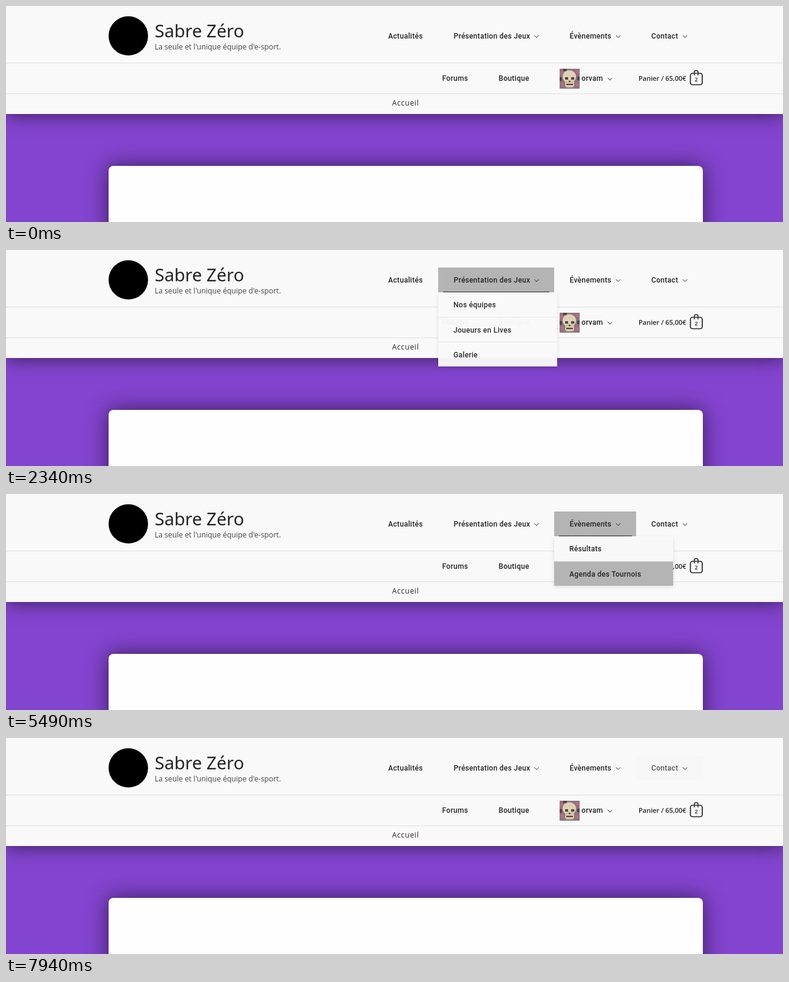
An HTML page that plays this animation: 1280 px wide and 358 px high, repeating every 8 s.

```html
<!DOCTYPE html>
<html lang="fr">
<head>
<meta charset="utf-8">
<title>Menu</title>
<style>
html, body { margin: 0; width: 100%; height: 100%; overflow: hidden; background: #8344cf; }
#stage { position: relative; width: 1280px; height: 358px; overflow: hidden; color: #242424; }
#stage * { position: absolute; box-sizing: border-box; }
#stage svg * { position: static; }
.card { left: 169px; top: 265px; width: 979px; height: 130px; border-radius: 8px; background: #fefefe; box-shadow: 0 0 35px rgba(0,0,0,.58); }
.header { left: 0; top: 0; width: 1280px; height: 179px; background: #f9f9f9; box-shadow: 0 2px 28px rgba(0,0,0,.55); }
.rule { left: 0; width: 1280px; height: 1px; background: #e0e0e0; }
.logo { left: 169px; top: 17px; width: 65px; height: 65px; border-radius: 50%; background: #000; }
.text { white-space: nowrap; line-height: 20px; font: 500 12px/20px Roboto, sans-serif; letter-spacing: .3px; }
.brand { font: 500 29px/20px "Noto Sans", "Open Sans", sans-serif; letter-spacing: 0; }
.tagline { font: 400 12.2px/20px "Open Sans", sans-serif; letter-spacing: 0; color: #444; }
.crumb { font: 400 12px/20px "Open Sans", sans-serif; letter-spacing: .75px; }
.cart { font: 600 11px/20px "Open Sans", sans-serif; letter-spacing: 0; }
.count { font: 600 9px/20px "Open Sans", sans-serif; letter-spacing: 0; }
.tab { top: 29px; height: 41px; background: #000; }
.line { top: 69px; height: 1px; background: #222; }
.sub { top: 70px; width: 196px; background: #f9f9f9; box-shadow: 0 2px 6px rgba(0,0,0,.12); }
.row { left: 0; width: 196px; height: 41px; }
.row + .row { border-top: 1px solid #e6e6e6; }
.shade { left: 0; top: 0; width: 100%; height: 100%; background: #000; }
#art { left: 0; top: 0; }
</style>
</head>
<body>
<div id="stage">
  <div class="card"></div>
  <div class="header"></div>
  <div class="rule" style="top:94px"></div>
  <div class="rule" style="top:145px"></div>
  <div class="logo"></div>
  <svg id="art" width="1280" height="180" fill="none" stroke="#242424">
    <g stroke="none">
      <path fill="#8b7480" d="M912 104h33v33h-33z"/>
      <path fill="#b66f80" d="M912 108h5v6h-5zM939 106h5v6h-5zM914 127h5v6h-5zM938 128h6v5h-6z"/>
      <path fill="#51434d" d="M918 104h6v4h-6zM912 118h4v6h-4zM941 117h4v6h-4z"/>
      <ellipse cx="928" cy="117" rx="11" ry="10.5" fill="#ded2b5"/>
      <rect x="921" y="122" width="15" height="13" rx="4" fill="#d3c5a6"/>
      <path fill="#504439" d="M921 118h5v4h-5zM931 118h5v4h-5zM927 124h3v2h-3zM923 129h11v2h-11z"/>
    </g>
    <rect x="1127.5" y="111.5" width="19.5" height="19" rx="3.5" stroke-width="1.7"/>
    <path d="M1134 115v-5.500q0-2.500 3-2.500t3 2.500v5.500" stroke-width="1.5"/>
  </svg>
</div>
<script>
const LOOP = 8000, FADE = 300, HIDE = 80, SHADE = .28;
const stage = document.getElementById('stage');
const art = document.getElementById('art');

// Spans are [enter, leave] times of the pointer, in ms.
const menus = [
  { label: 'Actualités', x0: 604, x1: 712, span: [1340, 2050], rows: [] },
  { label: 'Présentation des Jeux', x0: 712, x1: 903, span: [2050, 4660], rows: [
    { label: 'Nos équipes', spans: [[2820, 3060], [3840, 3925], [4110, 4640]] },
    { label: 'Joueurs en Lives', spans: [[3060, 3280], [3640, 3840], [3925, 4110]] },
    { label: 'Galerie', spans: [[3280, 3640]] } ] },
  { label: 'Évènements', x0: 903, x1: 1037.5, span: [4660, 6620], rows: [
    { label: 'Résultats', spans: [[5170, 5220], [5670, 5860], [6110, 6580]] },
    { label: 'Agenda des Tournois', spans: [[5220, 5670], [5860, 6110]] } ] },
  { label: 'Contact', x0: 1037.5, x1: 1148, span: [6620, 7690], rows: [
    { label: 'Nous rejoindre', spans: [[7060, 7690]] } ] }
];

function add(parent, className, style = {}, text = '') {
  const el = document.createElement('div');
  el.className = className;
  el.textContent = text;
  Object.assign(el.style, style);
  return parent.appendChild(el);
}
const label = (parent, x, middle, text, kind = '') =>
  add(parent, 'text ' + kind, { left: x + 'px', top: middle - 10 + 'px' }, text);

function chevron(x, y) {
  const path = document.createElementNS('http://www.w3.org/2000/svg', 'path');
  path.setAttribute('d', `M${x - 3.7} ${y - 1.8}l3.7 3.600l3.700 -3.600`);
  art.append(path);
}

label(stage, 245, 41, 'Sabre Zéro', 'brand');
label(stage, 245, 68, "La seule et l'unique équipe d'e-sport.", 'tagline');
label(stage, 718.5, 120, 'Forums');
label(stage, 811.5, 120, 'Boutique');
label(stage, 948, 120, 'orvam');
label(stage, 1042, 120, 'Panier / 65,00€', 'cart');
label(stage, 1134.5, 121.5, '2', 'count');
label(stage, 636, 161, 'Accueil', 'crumb');
[[874, 50.5], [1008.5, 50.5], [1118.5, 50.5], [995, 121]].forEach(p => chevron(...p));

for (const m of menus) {
  m.tab = add(stage, 'tab', { left: m.x0 + 'px', width: m.x1 - m.x0 + 'px' });
  m.lineIn = add(stage, 'line');
  m.lineOut = add(stage, 'line');
  m.title = label(stage, m.x0 + 25.5, 50, m.label);
}
stage.append(art);
for (const m of menus) {
  m.sub = add(stage, 'sub', { left: Math.round(m.x0) + 'px', height: m.rows.length * 41 + 'px' });
  m.rows.forEach((r, i) => {
    const row = add(m.sub, 'row', { top: i * 41 + 'px' });
    r.shade = add(row, 'shade');
    label(row, 25, 20.5, r.label);
  });
}

const ramp = (t, start, length = FADE) => Math.min(1, Math.max(0, (t - start) / length));
const ease = p => 1 - (1 - p) ** 2;
const level = (t, [enter, leave]) => ease(ramp(t, enter)) * (1 - ease(ramp(t, leave)));

function setLine(el, left, right, opacity) {
  el.style.left = left + 'px';
  el.style.width = Math.max(0, right - left) + 'px';
  el.style.opacity = opacity;
}

function draw(t) {
  for (const m of menus) {
    const [enter, leave] = m.span;
    const p = ease(ramp(t, enter)), q = ease(ramp(t, leave));
    const from = m.x0 - 14, left = m.x0 + 8, right = m.x1 - 7;
    m.tab.style.opacity = SHADE * level(t, m.span);
    // The underline grows in from the left and leaves to the right.
    setLine(m.lineIn, from + 22 * p, from + (right - from) * p ** 3, t < leave ? p : 0);
    setLine(m.lineOut, left + (m.x1 + 14 - left) * q ** .8, right + 21 * q, t < leave ? 0 : 1 - q);
    m.sub.style.opacity = ramp(t, enter) * (1 - ramp(t, leave, HIDE));
    for (const r of m.rows)
      r.shade.style.opacity = SHADE * Math.max(...r.spans.map(s => level(t, s)));
  }
  menus[3].title.style.color = t > 7740 ? '#555' : '';
}

const start = performance.now();
function tick() {
  draw((performance.now() - start) % LOOP);
  requestAnimationFrame(tick);
}
tick();
</script>
</body>
</html>
```
